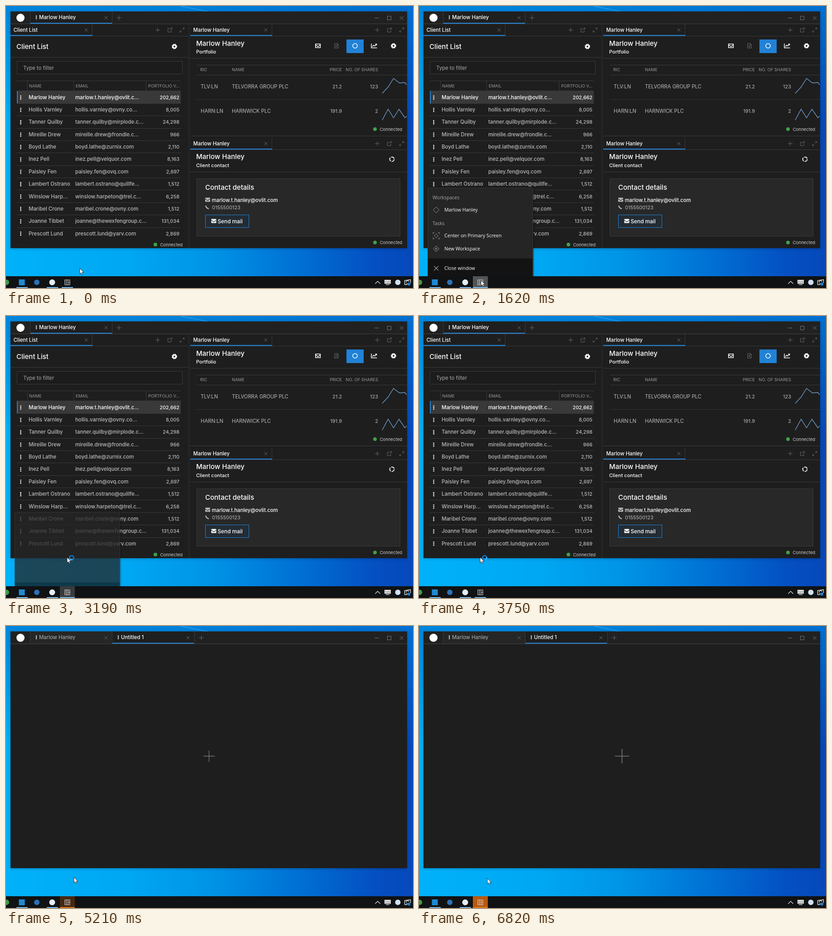
An HTML page that plays this animation: 899 by 623 pixels, repeating every 6.89 s.

```html
<!DOCTYPE html>
<html lang="en">
<head>
<meta charset="utf-8">
<title>Workspace launcher</title>
<style>
html, body { margin: 0; width: 100%; height: 100%; overflow: hidden; background: #0090e4; }
svg { display: block; width: 899px; height: 623px; font: 11.3px Inter, sans-serif; white-space: pre; }
.m { font-weight: 500; }
.menu { font-family: "Open Sans", sans-serif; font-size: 10.4px; }
</style>
</head>
<body>
<script>
const LOOP = 6890, BLUE = '#2182d6', LINE = '#3a3a3a', GREY = '#bcbcbc', DIM = '#666';

// --- drawing helpers -------------------------------------------------
const rect = (x, y, w, h, fill, more = '') =>
  `<rect x="${x}" y="${y}" width="${w}" height="${h}" fill="${fill}" ${more}/>`;
const text = (x, y, s, fill = GREY, size = 11.3, more = '') =>
  `<text x="${x}" y="${y}" fill="${fill}" font-size="${size}" ${more}>${s}</text>`;
const bold = (x, y, s, size = 11.3, more = '') => text(x, y, s, '#fff', size, `class="m" ${more}`);
const END = 'text-anchor="end"';
const path = (d, color, width = 1, more = '') =>
  `<path d="${d}" fill="none" stroke="${color}" stroke-width="${width}" ${more}/>`;
const at = (x, y, s, more = '') => `<g transform="translate(${x} ${y})" ${more}>${s}</g>`;
const dot = (x, y, r, fill) => `<circle cx="${x}" cy="${y}" r="${r}" fill="${fill}"/>`;

const cross = (x, y, r = 3.5, c = DIM) => at(x, y, path(`M${-r} ${-r}L${r} ${r}M${r} ${-r}L${-r} ${r}`, c));
const plus = (x, y, r = 5, c = DIM) => at(x, y, path(`M${-r} 0H${r}M0 ${-r}V${r}`, c));
const dots = (x, y, c = '#fff', gap = 3.5) => [-gap, 0, gap].map(d => dot(x, y + d, 1.3, c)).join('');
const gear = (x, y) => at(x, y,
  '<circle r="3.4" fill="none" stroke="#fff" stroke-width="3"/>' +
  '<circle r="5" fill="none" stroke="#fff" stroke-width="2" stroke-dasharray="2.2 1.73"/>');
const openIcon = (x, y) => at(x, y, path('M0 -3H-4.5V4.5H3V0M0 0L4.5 -4.5M1.5 -4.5H4.5V-1.5', DIM));
const expandIcon = (x, y) => at(x, y, path('M1 -1L4.5 -4.5M1.5 -4.5H4.5V-1.5M-1 1L-4.5 4.5M-1.5 4.5H-4.5V1.5', DIM));
const mail = (x, y, c) => at(x, y, rect(-5.5, -4.5, 11, 9, c, 'rx="1"') + path('M-5.5 -2L0 2L5.5 -2', '#282828', 1.1));
const connected = (x, y) => dot(x, y, 4, '#43a047') + text(x + 10.5, y + 3.5, 'Connected', '#ccc', 9.6);

const paneTab = (x, y, end, label) =>
  rect(x, y + 26, end - x, 1, LINE) + rect(x, y + 24, 181, 2, BLUE) + rect(x + 180, y, 1, 24, LINE) +
  bold(x + 6.5, y + 17, label) + cross(x + 167, y + 13) +
  plus(end - 68, y + 13) + openIcon(end - 41, y + 13) + expandIcon(end - 14, y + 13);

// --- content ----------------------------------------------------------
const client = 'Marlow Hanley';
const rows = [
  [client, 'marlow.t.hanley@ovlit.c...', '202,662'],
  ['Hollis Varnley', 'hollis.varnley@ovny.co...', '8,005'],
  ['Tanner Quilby', 'tanner.quilby@mirplode.c...', '24,298'],
  ['Mireille Drew', 'mireille.drew@frondle.c...', '966'],
  ['Boyd Lathe', 'boyd.lathe@zurnix.com', '2,110'],
  ['Inez Pell', 'inez.pell@velquor.com', '8,163'],
  ['Paisley Fen', 'paisley.fen@ovq.com', '2,697'],
  ['Lambert Ostrano', 'lambert.ostrano@quillfe...', '1,512'],
  ['Winslow Harp...', 'winslow.harpeton@trel.c...', '6,258'],
  ['Maribel Crone', 'maribel.crone@ovny.com', '1,512'],
  ['Joanne Tibbet', 'joanne@thewexfengroup.c...', '131,034'],
  ['Prescott Lund', 'prescott.lund@yarv.com', '2,869']
];

function clientRow([name, email, value], i) {
  const y = 201.7 + 27.35 * i, b = y + 4, color = i ? GREY : '#fff';
  const back = i ? '' : rect(24, 188, 362, 27, '#393939') + rect(24, 188, 2, 27, BLUE);
  const rule = i < 11 ? rect(24, Math.round(y + 13.3), 362, 1, '#383838') : '';
  return back + rule + dots(32.5, y + .5) + text(50, b, name, color, 11.4, 'class="m"') +
    text(153, b, email, color, 11.4, 'class="m"') + text(383, b, value, color, 10.8, `class="m" ${END}`);
}

const head = (x, y, s, more) => text(x, y, s, '#999', 9.4, more);

const clientList =
  paneTab(10, 40, 403, 'Client List') + bold(23, 95, 'Client List', 15) + gear(372, 89.5) +
  rect(10, 113, 393, 1, LINE) +
  rect(24.5, 122.5, 365, 28, '#1c1c1c', `stroke="${LINE}"`) + text(38, 141, 'Type to filter', '#aaa', 11.4) +
  rect(24, 165, 362, 1, LINE) + rect(24, 187, 362, 1, LINE) +
  [47, 149, 309].map(x => rect(x, 166, 1, 21, LINE)).join('') +
  head(51, 180, 'NAME') + head(154, 180, 'EMAIL') + head(314, 180, 'PORTFOLIO V...') +
  rows.map(clientRow).join('') + connected(330, 527);

const stock = (y, code, name, price, shares) =>
  text(430, y, code) + text(499, y, name, GREY, 11.2) +
  text(742, y, price, GREY, 11, END) + text(822, y, shares, GREY, 11, END);

const portfolio =
  paneTab(407, 40, 888, client) + bold(420, 88, client, 15) + bold(420, 105, 'Portfolio', 11) +
  at(689, 88, path('M-5.3 -4H5.3V4H-5.3ZM-5 -2L0 1.5L5 -2', '#fff', 1.5)) +
  at(730, 88, path('M-4 -5H1.5L4 -2.5V5H-4ZM1.5 -5V-2.5H4M-1.7 -1L1.7 3M1.7 -1L-1.7 3', '#686868', 1.1)) +
  rect(752, 74, 38, 30, BLUE) +
  '<circle cx="771" cy="88" r="5" fill="none" stroke="#fff" stroke-width="1.5"/>' +
  at(813, 88, path('M-6 -5V4.5H6.5M-4 2L-1 -1.5L1.5 .5L5.5 -4M2.5 -4H5.5V-1', '#fff', 1.5)) + gear(856, 88) +
  rect(407, 115, 479, 1, LINE) + rect(421, 130, 465, 1, LINE) + rect(421, 152, 465, 1, LINE) +
  head(429, 144, 'RIC') + head(499, 144, 'NAME') + head(742, 144, 'PRICE', END) +
  head(822, 144, 'NO. OF SHARES', END) +
  stock(182, 'TLV:LN', 'TELVORRA GROUP PLC', '21.2', '123') + rect(421, 206, 465, 1, '#343434') +
  stock(236, 'HARN:LN', 'HARNWICK PLC', '191.9', '2') +
  path('M831 193L844 179L856 160L869 170L881 169L885 174', '#6c9bc9', 1.4) +
  path('M831 252L844 228L856 247L868 228L881 247L885 243', '#6c9bc9', 1.4) +
  connected(815, 272);

const contact =
  rect(407, 286, 479, 4, '#2a2a2a') + rect(407, 289, 479, 1, '#141414') +
  paneTab(407, 291, 888, client) + bold(420, 338, client, 15) + bold(420, 356, 'Client contact', 11) +
  '<circle cx="852.5" cy="338.5" r="4.9" fill="none" stroke="#fff" stroke-width="1.8" stroke-dasharray="8.3 1.96"/>' +
  rect(407, 366, 479, 1, LINE) + rect(421.5, 381.5, 449, 127, '#282828', `stroke="${LINE}"`) +
  bold(440, 406, 'Contact details', 15) +
  mail(445.5, 428, '#bbb') + bold(454.5, 433, 'marlow.t.hanley@ovlit.com') +
  at(444.5, 444.5, path('M-3.3 -3.5Q-2.5 2.3 3.5 3.3', '#bbb', 2.2)) + text(455, 449, '0155500123', GREY, 11) +
  rect(440.5, 461.5, 96, 28, '#232c34', `stroke="${BLUE}"`) +
  mail(459, 475, '#fff') + bold(467.5, 479.5, 'Send mail', 11.8) + connected(815, 522.5);

const titleBar =
  rect(10, 12, 876, 28, '#212121') + rect(10, 39, 876, 1, '#444') +
  dot(32, 26, 9, '#fff') + rect(53, 12, 1, 27, LINE) + rect(234, 12, 1, 27, LINE) +
  path('M814.5 26.5H824M842.5 22.5H850.5V30.5H842.5Z', '#777') + cross(874, 26.5, 4, '#777');

const wsTab = (x, id, label) =>
  rect(x, 12, 180, 27, '#262626', `id="${id}Back"`) + dots(x + 13, 25, '#ddd', 3) +
  text(x + 19, 28.5, label, '#fff', 11.4, `id="${id}Text"`) + cross(x + 167, 26) +
  rect(x, 37, 180, 2, BLUE, `id="${id}Bar"`);

const diamond = path('M0 -6.5L6.5 0L0 6.5L-6.5 0Z', '#999');
const menu =
  rect(19, 398, 233, 240, '#252525', 'style="filter:drop-shadow(1px 0 1.5px #0008)"') +
  rect(19, 554, 233, 90, '#131313') + path('M19.5 640V398.5H251.5V640', '#383838') +
  `<g id="menuItems" class="menu">` +
  rect(20, 519, 231, 28, '#4a4a4a', 'id="hover"') +
  [[30, 424, 'Workspaces', '#aaa'], [56, 451, client, '#fff'], [30, 481, 'Tasks', '#aaa'],
   [56, 508, 'Center on Primary Screen', '#fff'], [56, 537, 'New Workspace', '#fff'], [56, 580, 'Close window', '#fff']]
    .map(([x, y, s, c]) => text(x, y, s, c, 10.6)).join('') +
  at(38, 447, diamond) +
  at(38, 504, path('M0 -4.5L4.5 0L0 4.5L-4.5 0ZM-7 -4V-7H-4M4 -7H7V-4M7 4V7H4M-4 7H-7V4', '#999')) +
  at(38, 533, diamond + path('M-3 0H3M0 -3V3', '#999')) + cross(38, 576, 5, '#fff') + '</g>';

const taskbar =
  rect(0, 597, 899, 26, '#101214') + rect(119, 597, 33, 26, '#fff', 'id="button"') +
  [23, 90].map(x => rect(x, 621, 25, 2, '#76b9ed')).join('') + rect(123, 621, 25, 2, '#76b9ed', 'id="buttonBar"') +
  dot(1, 610.5, 6, '#3f9b45') + rect(28.5, 604, 13, 13, '#1f8ad2') + dot(68, 610.5, 6, '#2a72b8') +
  dot(102, 610.5, 6.5, '#e4eef8') +
  at(135.5, 610.5, path('M-5.5 -5.5H5.5V5.5H-5.5ZM-2 -5.5V5.5M1.5 -5.5V5.5M1.5 0H5.5', '#ccc', 1.2)) +
  path('M815.5 613.5L821 608L826.5 613.5', '#eee', 1.2) +
  rect(836, 605, 14, 8.5, '#eee') + text(843, 612, 'SVG', '#444', 6, 'text-anchor="middle"') +
  path('M839 615.5H847', '#eee', 1.2) + dot(865.5, 610.5, 6, '#cfe0f2') +
  path('M880.5 615.5V606.5L893.5 604.5V612M880.5 615.5H886M884 611A3 3 0 0 1 890 609M890 611A3 3 0 0 1 884.5 612.5', '#eee', 1.3) +
  dot(890, 614.5, 3.2, '#1580d8');

const stops = list => list.map(([o, c, a = 1]) => `<stop offset="${o}" stop-color="${c}" stop-opacity="${a}"/>`).join('');

document.body.innerHTML = `<svg viewBox="0 0 899 623"><defs>
  <linearGradient id="sky" x2="1" y2="0">${stops([[0, '#00b2fa'], [.3, '#00a7f2'], [.5, '#0094e6'], [.72, '#0070d4'], [.9, '#0450c2'], [1, '#0648ba']])}</linearGradient>
  <linearGradient id="top" x2="0" y2="1">${stops([[0, '#007ad8', .8], [.42, '#007ad8', 0]])}</linearGradient>
  <clipPath id="desk"><path d="M0 0H899V597H0Z"/></clipPath></defs>
  ${rect(0, 0, 899, 623, 'url(#sky)')}${rect(0, 0, 899, 623, 'url(#top)')}
  ${path('M385 0L450 13', '#45b4f4', 1.5, 'opacity=".6"')}
  ${rect(10, 12, 876, 523, '#1e1e1e', 'style="filter:drop-shadow(0 1px 3px #0004)"')}
  ${titleBar}${wsTab(54, 'a', client)}
  <g id="panes">${plus(249.5, 26)}${clientList}${rect(403, 40, 4, 495, '#2a2a2a')}${rect(405, 40, 1, 495, '#151515')}${portfolio}${contact}</g>
  <g id="blank">${wsTab(235, 'b', 'Untitled 1')}${rect(416, 12, 1, 27, LINE)}${plus(431.5, 26)}
    <g id="bigPlus">${path('M-12.4 0H12.4M0 -12.4V12.4', '#777', 1.3)}</g></g>
  <g clip-path="url(#desk)"><g id="menu">${menu}</g></g>
  ${taskbar}
  <circle id="click" cx="134.5" cy="534" r="11" fill="#c0b414" opacity=".8"/>
  <g id="busy"><circle r="4.6" fill="none" stroke="#0f78d0" stroke-width="2.5"/>
    ${path('M0 -4.6A4.6 4.6 0 0 1 4.6 0', '#58b4f4', 2.5)}</g>
  <g id="cursor"><path d="M0 0V12.3L2.8 9.7L4.7 13.8L6.7 12.9L4.9 8.9H8.6Z" fill="#fff" stroke="#111" stroke-width=".8"/></g>
</svg>`;

// --- motion -----------------------------------------------------------
const $ = id => document.getElementById(id);
const set = (id, attrs) => { for (const k in attrs) $(id).setAttribute(k, attrs[k]); };
const show = (id, on) => set(id, { visibility: on ? 'visible' : 'hidden' });
const move = (id, x, y, more = '') => set(id, { transform: `translate(${x} ${y}) ${more}` });
const ramp = (t, from, to) => Math.min(1, Math.max(0, (t - from) / (to - from)));
const ease = p => p * p * (3 - 2 * p);
const wave = (t, period) => Math.cos(2 * Math.PI * t / period);

const track = [[180, 163, 579.5], [880, 137, 605], [950, 137, 606], [1900, 137, 606], [2310, 135, 533],
  [4170, 135, 533], [5000, 150, 555], [6820, 151, 557.5]];

function cursorAt(t) {
  let [, x, y] = track[0];
  for (let i = 1; i < track.length; i++) {
    const p = ease(ramp(t, track[i - 1][0], track[i][0]));
    x += (track[i][1] - track[i - 1][1]) * p;
    y += (track[i][2] - track[i - 1][2]) * p;
  }
  return [x, y];
}

function tabState(id, x, active, grow) {
  set(id + 'Back', { fill: active ? '#1f1f1f' : '#262626' });
  set(id + 'Text', { fill: active ? '#fff' : '#b5b5b5', 'font-weight': active ? 500 : 400 });
  set(id + 'Bar', { x: x + 90 * (1 - grow), width: 180 * grow });
}

function draw(t) {
  const [x, y] = cursorAt(t);
  move('cursor', x, y);

  const opening = ramp(t, 1280, 1740), closing = ramp(t, 3050, 3330);
  show('menu', t >= 1280 && t < 3330);
  move('menu', 0, 52 * (1 - opening) ** 2 + 136 * closing ** 2);
  set('menu', { opacity: Math.min(1, .2 + opening * 2) * (1 - .5 * closing) });
  set('menuItems', { opacity: 1 - ramp(t, 3050, 3150) });
  set('hover', { opacity: y < 548 ? 1 : 0 });
  show('click', t >= 2770 && t < 2910);
  show('busy', t >= 2910 && t < 4170);
  move('busy', 145, 534, `rotate(${t * .5})`);

  const blank = t >= 4170, swap = blank ? ease(ramp(t, 4090, 4490)) : 0;
  show('panes', !blank);
  show('blank', blank);
  tabState('a', 54, t < 4240, 1 - swap);
  tabState('b', 235, t >= 4240, swap);
  move('bigPlus', 448.5, 287.5, `scale(${1 + .18 * (1 - wave(t - 4170, 1000))})`);

  // Taskbar button: pointer hover, open menu, then an attention flash.
  const over = y > 596, held = over || (t > 1280 && t < 3400), flash = ramp(t, 4440, 4700);
  const glow = flash * (.66 + .34 * wave(t - 6820, 1060));
  const light = over ? (t > 1280 ? .28 : .14) : held ? .17 : 0;
  set('button', flash ? { fill: '#b8590f', opacity: glow } : { fill: '#fff', opacity: light });
  set('buttonBar', held || flash ? { x: 119, width: 33 } : { x: 123, width: 25 });
  set('buttonBar', { fill: flash ? '#e07a1c' : '#76b9ed' });
}

function frame() {
  draw(performance.now() % LOOP);
  requestAnimationFrame(frame);
}
frame();
</script>
</body>
</html>
```
